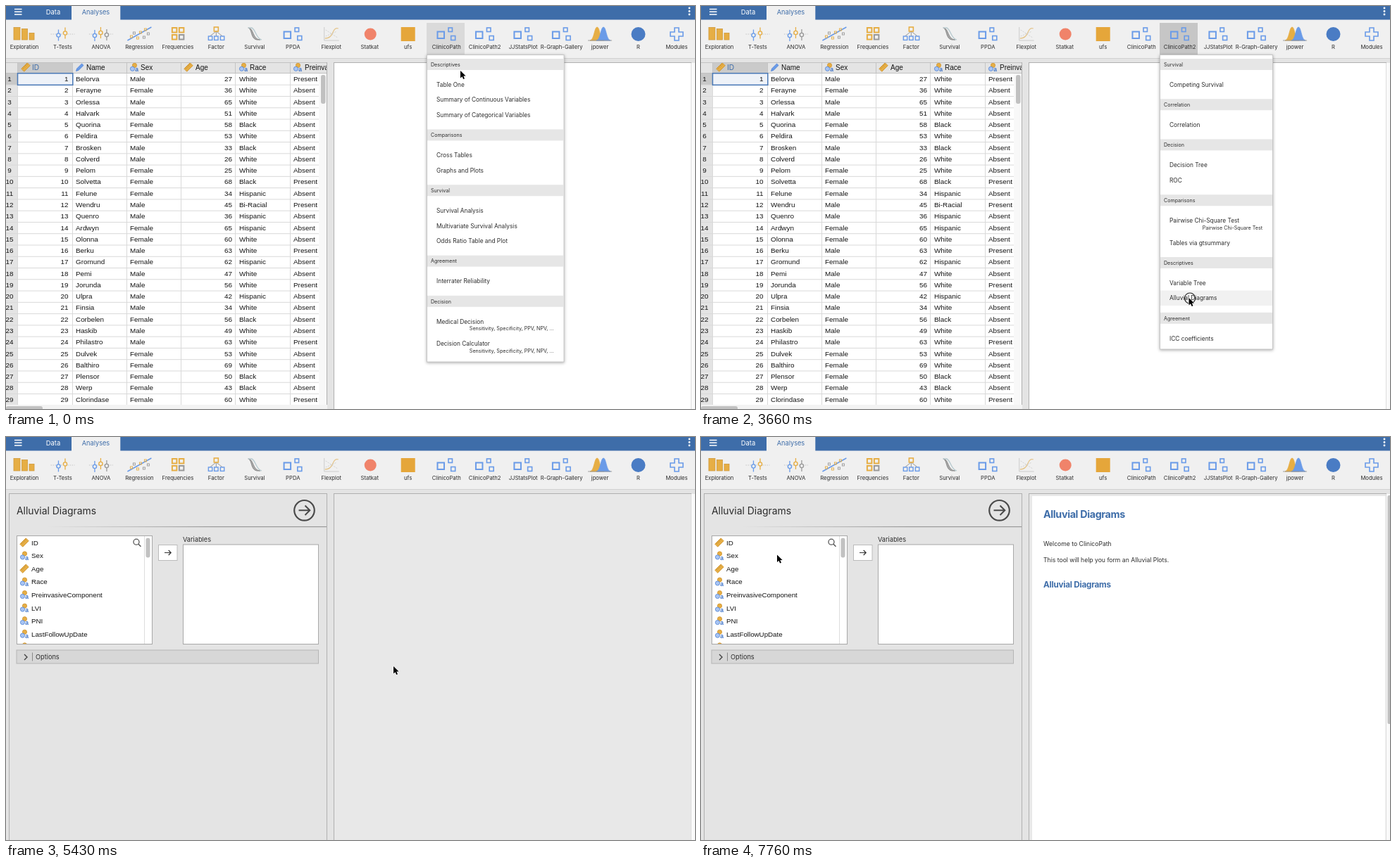
An HTML page that plays this animation: 978x573 px, repeating every 8 s.

```html
<!DOCTYPE html>
<html lang="en">
<head>
<meta charset="utf-8">
<title>Statistics app</title>
<style>
html, body { margin: 0; width: 100%; height: 100%; overflow: hidden; background: #e4e4e4; }
#stage { display: block; font-family: Inter, "Open Sans", sans-serif; fill: #2c2c2c; }
.grid { font-family: "Liberation Sans", Arial, sans-serif; fill: #141414; }
.page { font-weight: 700; fill: #3e6da9; }
</style>
</head>
<body>
<svg id="stage" width="978" height="573" viewBox="0 0 978 573"></svg>
<script>
const BLUE = '#6a9be8', GOLD = '#e6ae45', GREY = '#999', NAVY = '#3e6da9';

// Shape helpers; text is placed by its vertical centre.
const text = (x, y, s, size, attrs = '') =>
  `<text x="${x}" y="${y + size * .36}" font-size="${size}" ${attrs}>${s}</text>`;
const rect = (x, y, w, h, fill, stroke = 'none', sw = 1, attrs = '') =>
  `<rect x="${x}" y="${y}" width="${w}" height="${h}" fill="${fill}" stroke="${stroke}" stroke-width="${sw}" ${attrs}/>`;
const path = (d, stroke, sw = 1, fill = 'none', attrs = '') =>
  `<path d="${d}" fill="${fill}" stroke="${stroke}" stroke-width="${sw}" ${attrs}/>`;
const dot = (x, y, r, fill, stroke = 'none', sw = 1) =>
  `<circle cx="${x}" cy="${y}" r="${r}" fill="${fill}" stroke="${stroke}" stroke-width="${sw}"/>`;
const group = (id, body) => `<g id="${id}">${body}</g>`;
const at = (x, y, body) => `<g transform="translate(${x} ${y})">${body}</g>`;
const MID = 'text-anchor="middle"', END = 'text-anchor="end"';

// Variable type icons
const ruler = `<g transform="rotate(-45)">${rect(-6, -2.8, 12, 5.6, GOLD, '#cf9430', .8)}` +
  path('M-3.5-2.8v2.4M-1-2.8v2.4M1.5-2.8v2.4M4-2.8v2.4', '#b98226', .7) + '</g>';
const pencil = path('M-5.5 5.5L-4.4 2 2.6-5 5-2.6-2 4.4Z', '#4f82d4', .8, BLUE);
const nominal = dot(.5, -2.6, 3.1, GOLD, '#cf9430', .8) + dot(-2.5, 2.3, 3.1, '#a9c5f3', '#4f82d4', .8) +
  text(1.2, 3, 'a', 8.5, 'fill="#3f74c8" font-weight="700"');

// Toolbar icons, centred on 0,0
const pin = (x, y, c) => path(`M${x} ${y - 8}V${y + 8}`, c, 1.3) + dot(x, y, 2.6, '#f0f0f0', c, 1.4);
const dashes = path('M-17 0H17', '#bbb', .8, 'none', 'stroke-dasharray="1.5 1.5"');
const box = (x, y, s, c, sw = 1.6) => rect(x, y, s, s, 'none', c, sw);
const blocks = box(-12.7, -3.5, 9.5, BLUE, 2) + box(2.8, -9, 5.5, BLUE) + box(6.5, 2.5, 6, BLUE);
const bell = (x, c) => path(`M${x - 10} 9C${x - 4} 8 ${x - 4}-10 ${x}-10S${x + 4} 8 ${x + 10} 9Z`, c, .8, c);
const specks = [[-13, 2, GOLD], [-9, -3, GREY], [-4, 4, GOLD], [0, -4, GOLD], [5, 3, GREY], [7, -8, GOLD], [11, -2, GREY]];
const tools = [
  ['Exploration', rect(-15, -9.5, 9, 17.5, GOLD, '#cf9a3a', .8) + rect(-3.5, -7.5, 8, 15.5, GOLD, '#cf9a3a', .8) +
    rect(7, -1.5, 7, 9.5, GOLD, '#cf9a3a', .8)],
  ['T-Tests', dashes + pin(-6, 1.5, BLUE) + pin(3.5, -1.5, GOLD)],
  ['ANOVA', dashes + pin(-9, 2, BLUE) + pin(-.5, -2, GOLD) + pin(8, 1, GREY)],
  ['Regression', path('M-17 9L17-10', BLUE, 1.5) + specks.map(([x, y, c]) => box(x, y, 3, c, .9)).join('')],
  ['Frequencies', box(-8, -9, 6.5, GOLD, 2) + box(2, -9, 6.5, GOLD, 2) + box(-8, 1, 6.5, GOLD, 2) + box(2, 1, 6.5, GREY, 2)],
  ['Factor', path('M0-4L-9 3M0-4V3M0-4L9 3', GREY, 1) + box(-3, -10, 6, GOLD) +
    [-11, -2.7, 6].map(x => box(x, 3, 5.4, BLUE, 1.4)).join('')],
  ['Survival', path('M-9-9C-1-9-3 8 8 8H3C-6 6-3-7-9-9Z', '#888', 1, '#aaa') + path('M-9-9H-4C2-6 2 6 10 8', '#b9cbd0', 1.4)],
  ['PPDA', blocks],
  ['Flexplot', path('M-10-10V9H11', '#ccc', 1) + path('M-9 6Q-1 6 2-2T10-8', '#e4c58c', 1.3) +
    path('M-8-6L9 5M-8 3L8-4', '#c9c9c9', .8, 'none', 'stroke-dasharray="2 1.5"')],
  ['Statkat', dot(1, 0, 8.5, '#f0836a')],
  ['ufs', rect(-10, -10, 20, 20, '#e5a63a')],
  ['ClinicoPath', blocks], ['ClinicoPath2', blocks], ['JJStatsPlot', blocks], ['R-Graph-Gallery', blocks],
  ['jpower', bell(-4, GOLD) + bell(5, BLUE) + path('M-17 9H17', '#888', .8)],
  ['R', dot(0, 0, 10, '#4a7cc4')],
  ['Modules', path('M-3-9H3V-3H9V3H3V9H-3V3H-9V-3H-3Z', BLUE, 1.6)]
];

function toolbar() {
  return rect(0, 19, 978, 56, '#f0f0f0') + path('M0 74.5H978', '#d2d2d2') +
    rect(0, 0, 978, 19.5, NAVY) + rect(93, 0, 69.3, 20, '#f0f0f0') +
    path('M12 4.5H22.5M12 8.3H22.5M12 12H22.5', '#fff', 1.5) +
    [3, 7.5, 12].map(y => dot(970, y, 1.4, '#fff')).join('') +
    text(67, 8.5, 'Data', 9.4, `${MID} fill="#fff"`) + text(127.5, 8.5, 'Analyses', 9.2, `${MID} fill="${NAVY}"`) +
    rect(0, 24, 54, 45.5, '#dadada', 'none', 1, 'id="press"') +
    tools.map(([name, icon], i) => at(26 + i * 54.47, 0, at(0, 40, icon) + text(0, 58.3, name, 7.7, MID))).join('');
}

const names = ('Belorva Ferayne Orlessa Halvark Quorina Peldira Brosken Colverd Pelom Solvetta Felune Wendru Quenro ' +
  'Ardwyn Olonna Berku Gromund Pemi Jorunda Ulpra Finsia Corbelen Haskib Philastro Dulvek Balthiro Plensor Werp Clorindase').split(' ');
const sexes = 'MFMMFFMMFFFMMFFMFMMMMFMMFFFFF';
const ages = '2736655158533326256834453665606362475642345649635369504360';
const races = 'WWWWBWBWWBHRHHWWHWWHWBWWWWBBW';
const states = 'PAAAAAAAAPAPAAAPAAPAAAAPAAAAP';
const words = { M: 'Male', F: 'Female', W: 'White', B: 'Black', H: 'Hispanic', R: 'Bi-Racial', P: 'Present', A: 'Absent' };
const cols = [16.5, 94.5, 171.5, 248.5, 325.5, 403.5];

function table() {
  const step = 16.27, size = 9.9;
  const heads = [['ID', 37, ruler, 28], ['Name', 114, pencil, 105], ['Sex', 191, nominal, 182], ['Age', 269, ruler, 259],
    ['Race', 346, nominal, 337], ['Preinvasive', 424, nominal, 414]];
  let head = rect(0, 80, 456, 16, '#e4e4e4') + rect(16, 80, 78, 16, '#cacaca');
  heads.forEach(([s, x, icon, ix], i) => {
    head += at(ix, 87, icon) + text(x, 87.2, s, 10, i ? '' : `fill="${NAVY}"`) + path(`M${cols[i]} 80V96`, '#c4c4c4');
  });
  head += path('M0 80.5H456M0 95.5H456', '#c2c2c2');
  let body = rect(0, 96, 456, 477, '#fff') + rect(0, 96, 16, 471, '#e4e4e4') + rect(0, 96, 16, 16, '#c8c8c8');
  let cells = '', lines = '';
  names.forEach((name, i) => {
    const y = 103.5 + i * step;
    lines += `M0 ${112.2 + i * step}H456`;
    cells += text(5, y, i + 1, size, MID) + text(88.5, y, i + 1, size, END) + text(99, y, name, size) +
      text(176, y, words[sexes[i]], size) + text(321, y, ages.substr(i * 2, 2), size, END) +
      text(331, y, words[races[i]], size) + text(408, y, words[states[i]], size);
  });
  body += path(lines + cols.map(x => `M${x} 96V567`).join(''), '#d9d9d9') +
    rect(16.5, 95.7, 78.3, 16.6, '#eef2f8', '#4877b5', 1.5) + cells;
  return `<svg id="head" height="573">${head}</svg><svg id="body" height="573">${body}</svg>` +
    group('bar', rect(444, 96, 12, 477, '#f8f8f8') + rect(447, 98, 6.5, 41, '#c1c1c1', 'none', 1, 'rx="3"') +
      path('M455.5 80V573', '#b0b0b0')) +
    rect(0, 567, 456, 6, '#f3f3f3', 'none', 1, 'id="track"') + rect(0, 569, 52, 6, '#c1c1c1', 'none', 1, 'id="thumb" rx="3"') +
    rect(0, 76, 4, 497, '#e4e4e4', 'none', 1, 'id="edge"');
}

// Sections: heading, then items; "|" splits off an item's subtitle.
function menu(id, x, w, h, sections) {
  let y = 83.2, out = rect(x + .5, 69.5, w, h, '#fff', '#c6c6c6', 1, 'style="filter:drop-shadow(0 1px 2px #0005)"');
  if (id == 'menu2') out += rect(x + 1, 404.5, w - 1, 21.5, '#f1f1f1', 'none', 1, 'id="hover"');
  for (const [title, ...items] of sections) {
    out += rect(x + 1, y - 8.2, w - 1, 16, '#e6e6e6') + text(x + 6, y, title, 7.1);
    y += 7;
    for (const item of items) {
      const [name, sub] = item.split('|');
      y += 21.6;
      out += text(x + 14, y, name, 8.3);
      if (sub) out += text(x + w - 14, y += 10, sub, 7.15, END);
    }
    y += 28.6;
  }
  return group(id, out);
}
const scores = 'Sensitivity, Specificity, PPV, NPV, ...';
const menus = menu('menu1', 597, 194.5, 436.5, [
  ['Descriptives', 'Table One', 'Summary of Continuous Variables', 'Summary of Categorical Variables'],
  ['Comparisons', 'Cross Tables', 'Graphs and Plots'],
  ['Survival', 'Survival Analysis', 'Multivariate Survival Analysis', 'Odds Ratio Table and Plot'],
  ['Agreement', 'Interrater Reliability'],
  ['Decision', 'Medical Decision|' + scores, 'Decision Calculator|' + scores]
]) + menu('menu2', 651, 160, 418.5, [
  ['Survival', 'Competing Survival'], ['Correlation', 'Correlation'], ['Decision', 'Decision Tree', 'ROC'],
  ['Comparisons', 'Pairwise Chi-Square Test|Pairwise Chi-Square Test', 'Tables via gtsummary'],
  ['Descriptives', 'Variable Tree', 'Alluvial Diagrams'], ['Agreement', 'ICC coefficients']
]);

function options() {
  const vars = ['ID', 'Sex', 'Age', 'Race', 'PreinvasiveComponent', 'LVI', 'PNI', 'LastFollowUpDate', 'Death'];
  const list = vars.map((s, i) => at(11, 10 + i * 18.55, (i == 0 || i == 2 ? ruler : nominal) + text(10, .3, s, 9.75))).join('');
  return group('panel', rect(4.5, 80.5, 451, 500, '#e4e4e4', '#b0b0b0') + rect(58, 127, 397, 1.2, 'url(#fade)')) +
    group('busy', dot(423.5, 104.3, 14.3, 'none', '#777', 2.4) + box(418, 99, 11, '#777', 1.6)) +
    group('form', text(15, 104.5, 'Alluvial Diagrams', 13.9) + dot(423.5, 104.3, 14.3, 'none', '#4a4a4a', 2.2) +
      path('M415.5 104.3H431M424.5 97.5L431.3 104.3L424.5 111', '#4a4a4a', 2) +
      rect(15.5, 140.5, 192, 154, '#fff', '#a8a8a8') + path('M196.5 141V294', '#ddd') +
      rect(198.5, 143.5, 6, 28, '#c1c1c1', 'none', 1, 'rx="3"') +
      `<svg x="15" y="140" width="180" height="154" class="grid">${list}</svg>` +
      dot(185, 149.2, 4, 'none', '#555', 1.3) + path('M188 152.2L191.5 155.7', '#555', 1.5) +
      rect(216.5, 153.5, 26.5, 22, '#fff', '#bbb') + path('M225 164.5H234M230.7 161L234.2 164.5L230.7 168', '#333', 1.2) +
      text(251, 145.3, 'Variables', 9.2) + rect(251.5, 153, 192, 141.5, '#fff', '#a8a8a8') +
      rect(15, 303, 428.5, 19, '#d7d7d7', '#b5b5b5') + path('M26 309L30 313L26 317', '#444', 1.4) +
      path('M37.5 306.5V318.5', '#888') + text(42, 312.3, 'Options', 9.2));
}

const results = rect(465.5, 80.5, 507, 500, '#fff', '#b0b0b0', 1, 'id="sheet"') + rect(973, 81, 5, 492, '#fafafa') +
  path('M972.5 81V573', '#dcdcdc') +
  group('report', rect(470, 84, 501.5, 422, '#fff', 'none', 1, 'id="paper"') +
    text(486, 110, 'Alluvial Diagrams', 14.3, 'class="page" letter-spacing="-.35"') +
    text(486, 151.6, 'Welcome to ClinicoPath', 8.65) +
    text(486, 174.8, 'This tool will help you form an Alluvial Plots.', 8.65) +
    text(486, 210, 'Alluvial Diagrams', 11.7, 'class="page" letter-spacing="-.22"') +
    text(482, 572.5, 'References', 16, 'class="page" letter-spacing="-.5" id="refs"') +
    rect(974.5, 83, 5, 370, '#c1c1c1', 'none', 1, 'id="scroll" rx="2"'));

const $ = id => document.getElementById(id);
$('stage').innerHTML = '<defs><linearGradient id="fade"><stop stop-color="#999" stop-opacity="0"/><stop offset=".6" stop-color="#999"/></linearGradient></defs>' +
  rect(0, 0, 978, 573, '#e4e4e4') + `<g id="data" class="grid">${table()}</g>` + options() + results + toolbar() + menus +
  group('ring', dot(694, 415.5, 7.5, 'none', '#222', 1.1)) +
  group('cursor', path('M0 0V12L2.8 9.4L4.7 13.6L6.8 12.7L4.9 8.6H8.6Z', '#fff', 1.2, '#000',
    'paint-order="stroke" stroke-linejoin="round" transform="scale(.88)"'));

// Pointer travel: start, end, number of steps, waypoints
const moves = [
  [140, 1180, 7, [645, 92], [648, 76], [661, 64], [674.5, 54]],
  [1780, 1930, 2, [674.5, 54], [674.5, 59]],
  [2380, 3060, 5, [674.5, 59], [690, 170], [716, 310], [710, 418]],
  [3360, 3660, 3, [710, 418], [692.5, 415]],
  [3800, 4250, 3, [692.5, 415], [600, 345], [522, 310], [550, 326]],
  [5700, 5970, 2, [550, 326], [528, 310.5], [204, 247]],
  [6260, 7170, 7, [204, 247], [150, 165], [120, 145], [111, 177]],
  [7320, 7760, 4, [111, 177], [108, 167.5]]
];

function pointer(t) {
  const [a, b, n, ...pts] = moves.filter(m => t >= m[0]).pop() || moves[0];
  const k = t < a ? 0 : Math.min(n, Math.floor((t - a) / (b - a) * (n - 1) + 1e-6) + 1) / n;
  const u = k * (pts.length - 1), i = Math.min(pts.length - 2, Math.floor(u)), f = u - i;
  return pts[i].map((v, j) => v + (pts[i + 1][j] - v) * f);
}

const show = (id, on) => $(id).style.display = on ? '' : 'none';
const set = (id, name, v) => $(id).setAttribute(name, v);

function draw(t) {
  const second = t >= 660, closed = t >= 3800, started = t >= 4570;
  show('menu1', !second);
  show('menu2', second && !closed);
  show('press', !closed);
  set('press', 'x', second ? 651 : 597);
  set('press', 'fill', t >= 3510 ? '#c6c6c6' : '#dadada');
  show('hover', t >= 3360);
  show('ring', t >= 3660 && !closed);

  // The data view narrows away before the options appear.
  const w = t < 4570 ? 456 : t < 4780 ? 444 : t < 5020 ? 398 : 200;
  set('head', 'width', w);
  set('body', 'width', w - 12);
  set('bar', 'transform', `translate(${w - 456} 0)`);
  set('track', 'width', w);
  set('thumb', 'width', Math.max(20, 52 - (456 - w) * .24));
  show('data', t < 5220);
  show('edge', started);
  show('panel', t >= 5220);
  show('busy', t >= 5220 && t < 5430);
  show('form', t >= 5430);

  set('sheet', 'fill', started ? '#e8e8e8' : '#fff');
  show('report', t >= 5700);
  set('paper', 'height', t < 5970 ? 422 : 489);
  show('refs', t < 5970);
  set('scroll', 'height', t < 5970 ? 370 : t < 6260 ? 332 : 325);
  set('cursor', 'transform', `translate(${pointer(t)})`);
}

const start = performance.now();
function tick() {
  draw((performance.now() - start) % 8000);
  requestAnimationFrame(tick);
}
tick();
</script>
</body>
</html>
```
